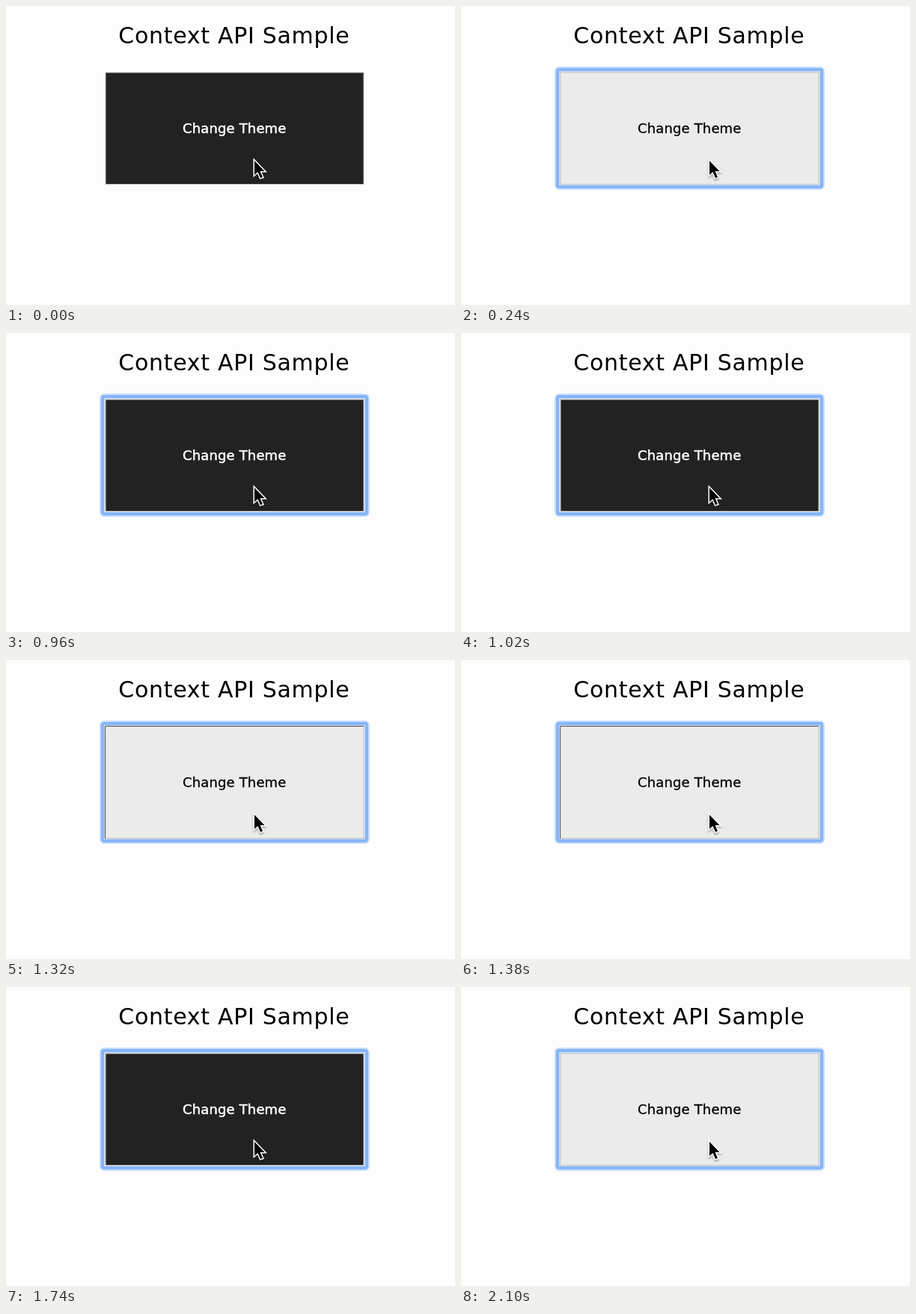
Animation of 600 by 400 pixels, one loop 2160 ms. Source, as an HTML page:

```html
<!DOCTYPE html>
<html lang="en">
<head>
<meta charset="utf-8">
<title>Context API Sample</title>
<style>
  html, body { margin: 0; width: 100%; height: 100%; overflow: hidden; background: #fdfdfd; }
  svg { display: block; width: 600px; height: 400px; }
  text { font-family: "DejaVu Sans", sans-serif; white-space: pre; }
  #title { font-size: 30px; letter-spacing: .7px; fill: #000; }
  #label { font-size: 18px; letter-spacing: .15px; fill: #000; stroke: #000; stroke-width: .3px; }
  #face { fill: #ebebeb; }
  #edge, #inset, #ring rect { fill: none; }
  #edge { stroke: #c4c4c4; }
  #inset { stroke: #5c5c5c; }
  .glow { stroke: #cbdcf2; }
  .dark #face { fill: #222; }
  .dark #label { fill: #fff; stroke: #fff; stroke-width: .5px; }
</style>
</head>
<body>
<svg id="stage" viewBox="0 0 600 400">
  <defs>
    <filter id="blur" x="-50%" y="-50%" width="200%" height="200%">
      <feGaussianBlur stdDeviation="1.3"/>
    </filter>
    <path id="arrow" d="M332 207V226L336.5 222L340 230L343 229L339.5 221H345.5Z"/>
  </defs>
  <text id="title" x="150.3" y="50">Context API Sample</text>
  <rect id="face" x="133" y="89" width="345" height="150"/>
  <g id="ring">
    <rect x="128.5" y="84.5" width="354" height="158" rx="3" stroke="#a6c9fb" stroke-opacity=".6" stroke-width="7"/>
    <rect x="129" y="85" width="353" height="157" rx="2" stroke="#86b5f8" stroke-width="4"/>
    <rect class="glow" x="132" y="88" width="347" height="151" stroke-width="1.5"/>
  </g>
  <rect id="edge" x="133" y="89" width="345" height="149.5"/>
  <path id="inset" d="M132.5 239V88.5H478"/>
  <text id="label" x="236" y="170">Change Theme</text>
  <use href="#arrow" y="2" fill="#000" stroke="#000" stroke-width="3" opacity=".3" filter="url(#blur)"/>
  <use href="#arrow" fill="#000" stroke="#fff" stroke-width="3" paint-order="stroke"/>
</svg>
<script>
  const LOOP = 2160, HOLD = 120;
  const releases = [180, 720, 1080, 1440, 1800];
  const get = id => document.getElementById(id);
  const show = (id, on) => get(id).style.visibility = on ? "visible" : "hidden";

  function draw(t) {
    // Each release of the mouse button swaps the theme.
    const dark = releases.filter(r => t >= r).length % 2 === 0;
    const pressed = releases.some(r => t >= r - HOLD && t < r);
    get("stage").classList.toggle("dark", dark);
    show("ring", t >= releases[0] - HOLD);
    show("inset", pressed && !dark);
  }

  const start = performance.now();
  function tick() {
    draw((performance.now() - start) % LOOP);
    requestAnimationFrame(tick);
  }
  draw(0);
  requestAnimationFrame(tick);
</script>
</body>
</html>
```
